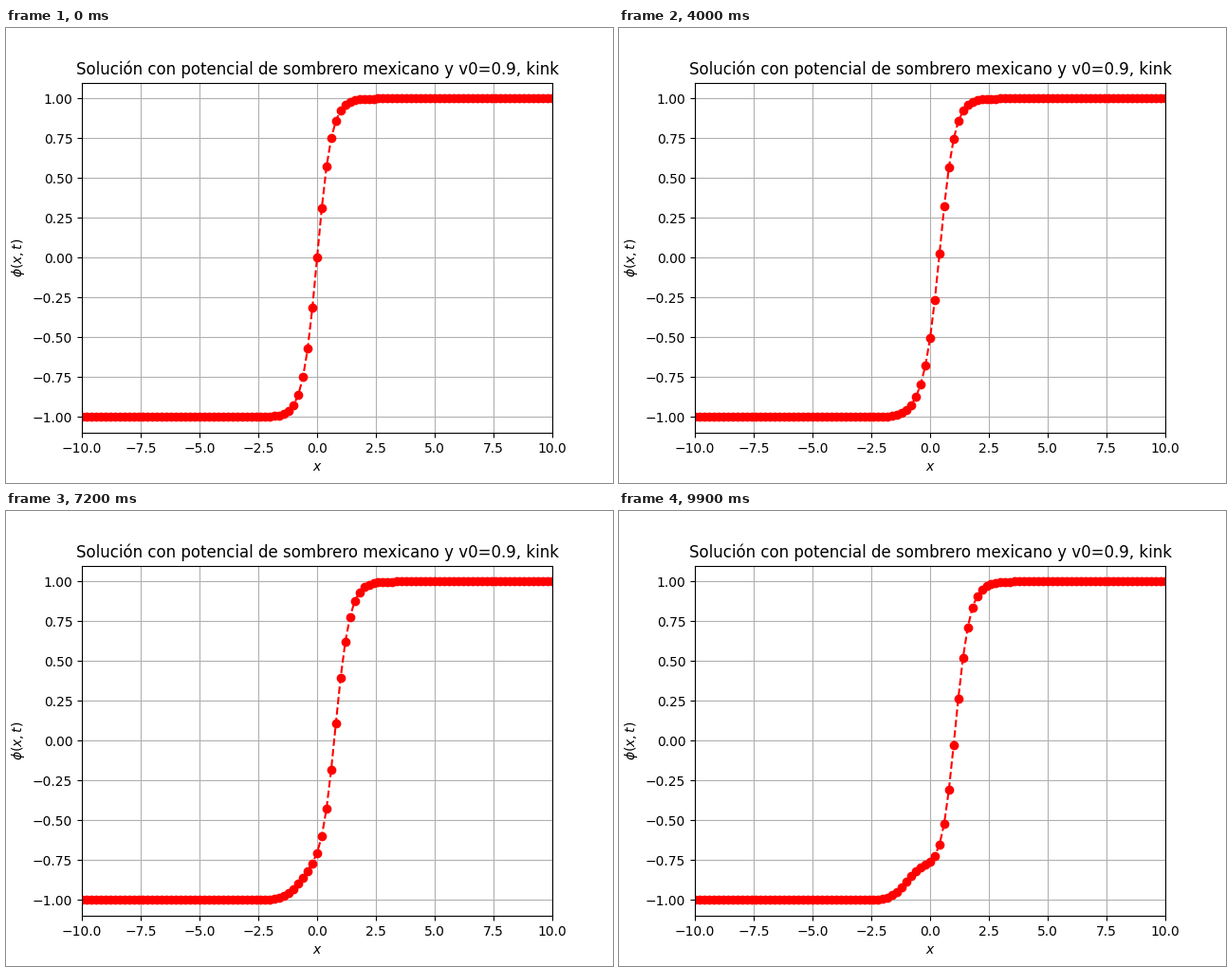
Animation, 640 px wide and 480 px high, one loop 10 s. Source, as a matplotlib script:

```python
import numpy as np
import matplotlib.pyplot as plt
from matplotlib.animation import FuncAnimation

FRAMES, INTERVAL = 100, 100   # 10 s loop
V0, DT = 0.9, 0.01

x = np.linspace(-10, 10, 101)
dx = x[1] - x[0]


def accel(phi):
    """Discrete wave operator plus the quartic-potential force."""
    a = np.zeros_like(phi)
    a[1:-1] = (phi[2:] - 2 * phi[1:-1] + phi[:-2]) / dx**2
    a[1:-1] += phi[1:-1]**3 - phi[1:-1]
    return a


def solve():
    """Leapfrog evolution of a boosted kink, one state per frame."""
    k = 1 / np.sqrt(2 * (1 - V0**2))
    phi = np.tanh(k * x)
    vel = -V0 * k * (1 - phi**2)
    states = [phi, phi + DT * vel + DT**2 / 2 * accel(phi)]
    while len(states) < FRAMES:
        prev, cur = states[-2:]
        states.append(2 * cur - prev + DT**2 * accel(cur))
    return states


states = solve()

fig, ax = plt.subplots(figsize=(6.4, 4.8), dpi=100)
line, = ax.plot(x, states[0], "ro--")
ax.set_xlim(-10, 10)
ax.set_ylim(-1.1, 1.1)
ax.set_title("Solución con potencial de sombrero mexicano y v0=0.9, kink")
ax.set_xlabel("$x$")
ax.set_ylabel(r"$\phi(x,t)$")
ax.grid(True)


def update(i):
    line.set_ydata(states[i])
    return line,


anim = FuncAnimation(fig, update, frames=FRAMES, interval=INTERVAL,
                     repeat=True, repeat_delay=0)
plt.show()
```
